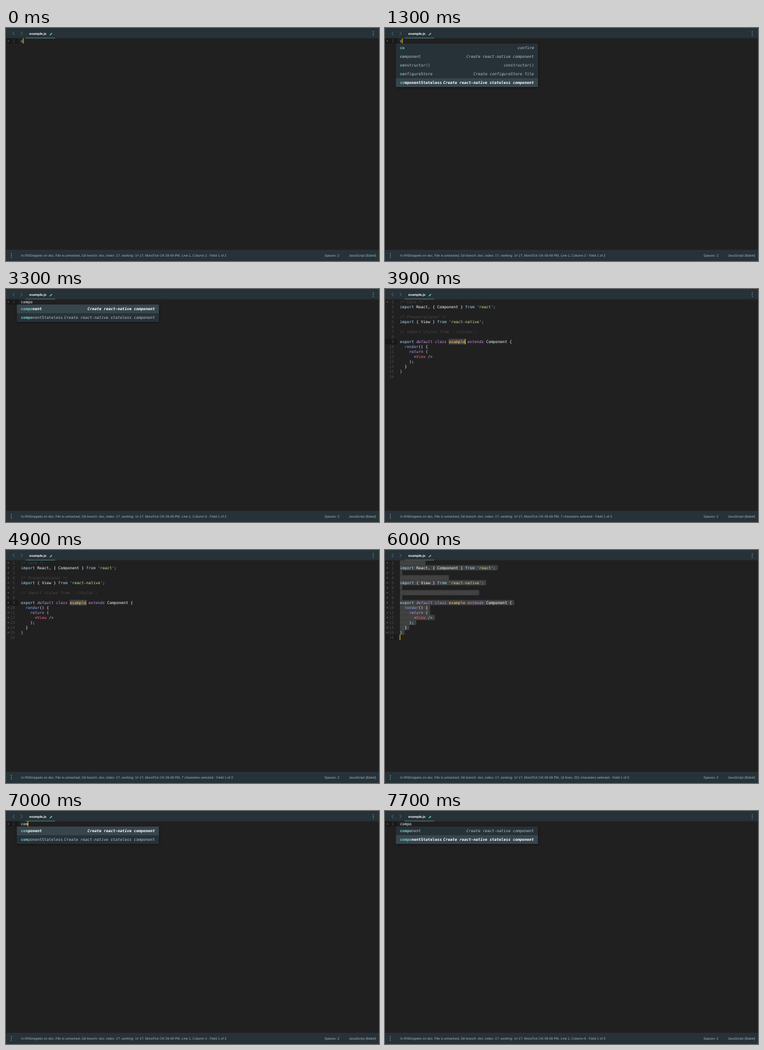
Animation, 600 px wide and 375 px high, one loop 8000 ms. Source, as an HTML page with a canvas:

```html
<!DOCTYPE html>
<html lang="en">
<head>
<meta charset="utf-8">
<title>Editor snippets</title>
<style>
html, body { margin: 0; width: 100%; height: 100%; overflow: hidden; background: #212021; }
canvas { display: block; width: 600px; height: 375px; }
</style>
</head>
<body>
<canvas id="stage"></canvas>
<script>
const LOOP = 8000, CH = 3.75, LEFT = 24, ROW = 8;
const MONO = '6.23px "DejaVu Sans Mono", monospace';
const SANS = '5.38px "Liberation Sans", Arial, sans-serif';
const BAR = '#263238';
const COLORS = {
  w: '#eeffff', i: '#a6e2fa', p: '#89ddff', k: '#c792ea', s: '#c3e88d',
  c: '#4a4a4a', y: '#ffcb6b', f: '#82aaff', t: '#f4606c'
};
const ITALIC = 'kc';

// Each token is its colour key, a colon and its text; tokens are split by "|".
const CODE = [
  'c:/* Core */',
  "i:import|w: React, { Component } |i:from|p: '|s:react|p:';",
  '',
  'c:/* Presentational */',
  "i:import|w: { View } |i:from|p: '|s:react-native|p:';",
  '',
  "c:// import styles from './styles';",
  '',
  'i:export|k: default class |y:example|k: extends |w:Component {',
  'f:  render|w:() {',
  'k:    return|w: (',
  'p:      <|t:View|p: />',
  'w:    );',
  'w:  }',
  'p:}',
  ''
].map(line => line ? line.split('|').map(t => [t[0], t.slice(2)]) : []);

const STATELESS = ['componentStateless', 'Create react-native stateless component'];
const COMPONENT = ['component', 'Create react-native component'];
const SHARED = [
  COMPONENT,
  ['constructor()', 'constructor()'],
  ['configureStore', 'Create configureStore file'],
  STATELESS
];
const LISTS = {
  c: { right: 253, rows: [
    ['cdud', 'componentDidUpdate(object prevProps, object prevState)'],
    ['cwrp', 'componentWillReceiveProps(object nextProps)'],
    ['cwum', 'componentWillUnmount()'],
    ['cwud', 'componentWillUpdate(object nextProps, object nextState)'],
    ...SHARED
  ] },
  co: { right: 246, rows: [['co', 'confirm'], ...SHARED] },
  com: { right: 246, rows: [COMPONENT, STATELESS] }
};

// start time, typed text, popup list, matched prefix, selected row
const TYPING = [
  [0, 'c'], [300, ''], [1200, 'c'],
  [1300, 'c', 'co', 'co', 4], [1400, 'co', 'co', 'co', 4],
  [1600, 'com', 'com', 'com', 0], [1700, 'compo', 'com', 'compo', 0],
  [6400, ''], [6500, 'c'], [6600, 'c', 'c', 'c', 7],
  [6700, 'c', 'co', 'co', 4], [6800, 'co', 'co', 'co', 4],
  [7000, 'com', 'com', 'com', 0], [7100, 'compo', 'com', 'compo', 0],
  [7500, 'compo', 'com', 'compo', 1]
];
const EXPAND = 3700, MARKS = 4100, SELECT_ALL = 5900, CLEAR = 6400;

// caret fades: start, steps, final opacity
const FADES = [
  [0, 1, 1], [700, 3, 0], [1200, 1, 1], [2100, 3, 0], [2600, 4, 1], [3100, 3, 0],
  [3700, 1, 1], [4300, 4, 0], [4900, 3, 1], [5300, 4, 0], [5900, 1, 1],
  [7500, 3, 0]
];

const canvas = document.getElementById('stage');
const ctx = canvas.getContext('2d');
const scale = window.devicePixelRatio || 1;
canvas.width = 600 * scale;
canvas.height = 375 * scale;

const latest = (list, t) => list.filter(e => e[0] <= t).pop();

function rect(x, y, w, h, color, r = 0) {
  ctx.fillStyle = color;
  ctx.beginPath();
  ctx.roundRect(x, y, w, h, r);
  ctx.fill();
}

function dot(x, y, r, color) {
  ctx.fillStyle = color;
  ctx.beginPath();
  ctx.arc(x, y, r, 0, 7);
  ctx.fill();
}

function stroke(color, width, ...pts) {
  ctx.strokeStyle = color;
  ctx.lineWidth = width;
  ctx.beginPath();
  pts.forEach(([x, y]) => ctx.lineTo(x, y));
  ctx.stroke();
}

function text(str, x, y, color, font, align = 'left') {
  ctx.font = font;
  ctx.fillStyle = color;
  ctx.textAlign = align;
  ctx.fillText(str, x, y);
}

const lineTop = i => 16.5 + i * ROW;
const baseline = i => 22.8 + i * ROW;

function drawBars(status) {
  rect(0, 0, 600, 16.5, BAR);
  stroke('#607d8b', 0.8, [13.8, 6], [10.8, 8.8], [13.8, 11.6]);
  stroke('#607d8b', 0.8, [23.6, 6], [26.6, 8.8], [23.6, 11.6]);
  text('example.js', 37.6, 11.4, '#ffffff', 'bold ' + SANS);
  stroke('#80cbc4', 1.4, [70.6, 11.6], [74, 8.2]);
  rect(31.5, 15.7, 47.5, 0.9, '#5f9c9a');
  rect(0, 357, 600, 18, BAR);
  for (const d of [-3, 0, 3]) {
    dot(590.8, 8.8 + d, 0.7, '#90a4ae');
    dot(8.6, 366 + d, 0.7, '#90a4ae');
  }
  const lead = 'In RNSnippets on doc, File is untracked, Git branch: doc, index: 1?, ' +
    'working: 1≠ 1?, MoraTick OK 09:49 PM, ';
  text(lead + status, 24.3, 367.9, '#a3b2b9', SANS);
  text('Spaces: 2', 512.3, 367.9, '#a3b2b9', SANS);
  text('JavaScript (Babel)', 551.6, 367.9, '#a3b2b9', SANS);
}

function drawGutter(count, marked, active) {
  rect(0, lineTop(active), 20, ROW + 0.5, '#1a191a');
  for (let i = 0; i < count; i++) {
    text(String(i + 1), 14.3, baseline(i), '#4c4c4c', MONO, 'right');
    if (i < marked) dot(3.7, baseline(i) - 1.9, 1.1, '#5c5c5c');
  }
}

function drawCaret(x, line, t) {
  const at = FADES.findLastIndex(f => f[0] <= t);
  const [start, steps, end] = FADES[at];
  const k = Math.min(1, (Math.floor((t - start) / 100) + 1) / steps);
  const eased = k * k * (3 - 2 * k);
  ctx.globalAlpha = end ? eased : 1 - eased;
  rect(x - 0.4, lineTop(line), 1, ROW + 0.5, '#ffcc00');
  ctx.globalAlpha = 1;
}

function drawCode(all) {
  CODE.forEach((tokens, i) => {
    const line = tokens.map(t => t[1]).join('');
    if (all && i < 15) rect(LEFT, lineTop(i), (line.length + 1) * CH, ROW + 0.2, '#404040', 1);
    let col = 0;
    for (const [key, str] of tokens) {
      const font = (ITALIC.includes(key) ? 'italic ' : '') + MONO;
      text(str, LEFT + col * CH, baseline(i), COLORS[key], font);
      col += str.length;
    }
    if (!all) return;
    [...line].forEach((ch, n) => {
      if (ch === ' ') dot(LEFT + (n + 0.5) * CH, baseline(i) - 2, 0.4, '#707070');
    });
  });
}

function drawPopup({ right, rows }, match, selected) {
  const x = 17.5, top = 25, h = 14;
  ctx.save();
  ctx.shadowColor = 'rgba(0,0,0,.45)';
  ctx.shadowBlur = 4 * scale;
  ctx.shadowOffsetY = scale;
  rect(x, top, right - x, rows.length * h, BAR);
  ctx.restore();
  const edge = rows.length > 5 ? right - 3 : right;
  rows.forEach(([name, hint], i) => {
    const y = top + i * h + 9.1;
    const on = i === selected;
    const color = on ? '#ffffff' : '#b6c3c9';
    const weight = on ? 'bold ' : '';
    if (on) rect(x, top + i * h, edge - x, h, '#37454d');
    const n = name.startsWith(match) ? match.length : 1;
    text(name.slice(0, n), LEFT, y, '#80cbc4', 'bold ' + MONO);
    text(name.slice(n), LEFT + n * CH, y, color, weight + MONO);
    text(hint, right - 6.3 - hint.length * CH, y, color, 'italic ' + weight + MONO);
  });
}

function drawExpanded(t) {
  const all = t >= SELECT_ALL;
  const active = all ? 15 : 8;
  drawBars((all ? '16 lines, 251' : '7') + ' characters selected - Field 1 of 3');
  drawGutter(16, t >= MARKS ? 15 : 1, active);
  if (!all) {
    const x = LEFT + 21 * CH, w = 7 * CH;
    rect(x - 0.3, lineTop(8), w + 0.6, ROW + 0.5, '#565450', 1);
    rect(x + 0.3, lineTop(8) + 0.6, w - 0.6, ROW - 0.7, '#454340', 1);
  }
  drawCode(all);
  drawCaret(all ? LEFT : LEFT + 28 * CH, active, t);
}

function drawTyping(t) {
  const [, str, list, match, selected] = latest(TYPING, t);
  const fields = t < EXPAND ? 2 : 3;
  drawBars(`Line 1, Column ${str.length + 1} - Field 1 of ${fields}`);
  drawGutter(1, 1, 0);
  text(str, LEFT, baseline(0), COLORS.w, MONO);
  drawCaret(LEFT + str.length * CH, 0, t);
  if (list) drawPopup(LISTS[list], match, selected);
}

function draw(now) {
  const t = now % LOOP;
  ctx.setTransform(scale, 0, 0, scale, 0, 0);
  ctx.textRendering = 'geometricPrecision';
  rect(0, 0, 600, 375, '#212021');
  if (t >= EXPAND && t < CLEAR) drawExpanded(t);
  else drawTyping(t);
}

const begin = performance.now();
function tick() {
  draw(performance.now() - begin);
  requestAnimationFrame(tick);
}
tick();
</script>
</body>
</html>
```
